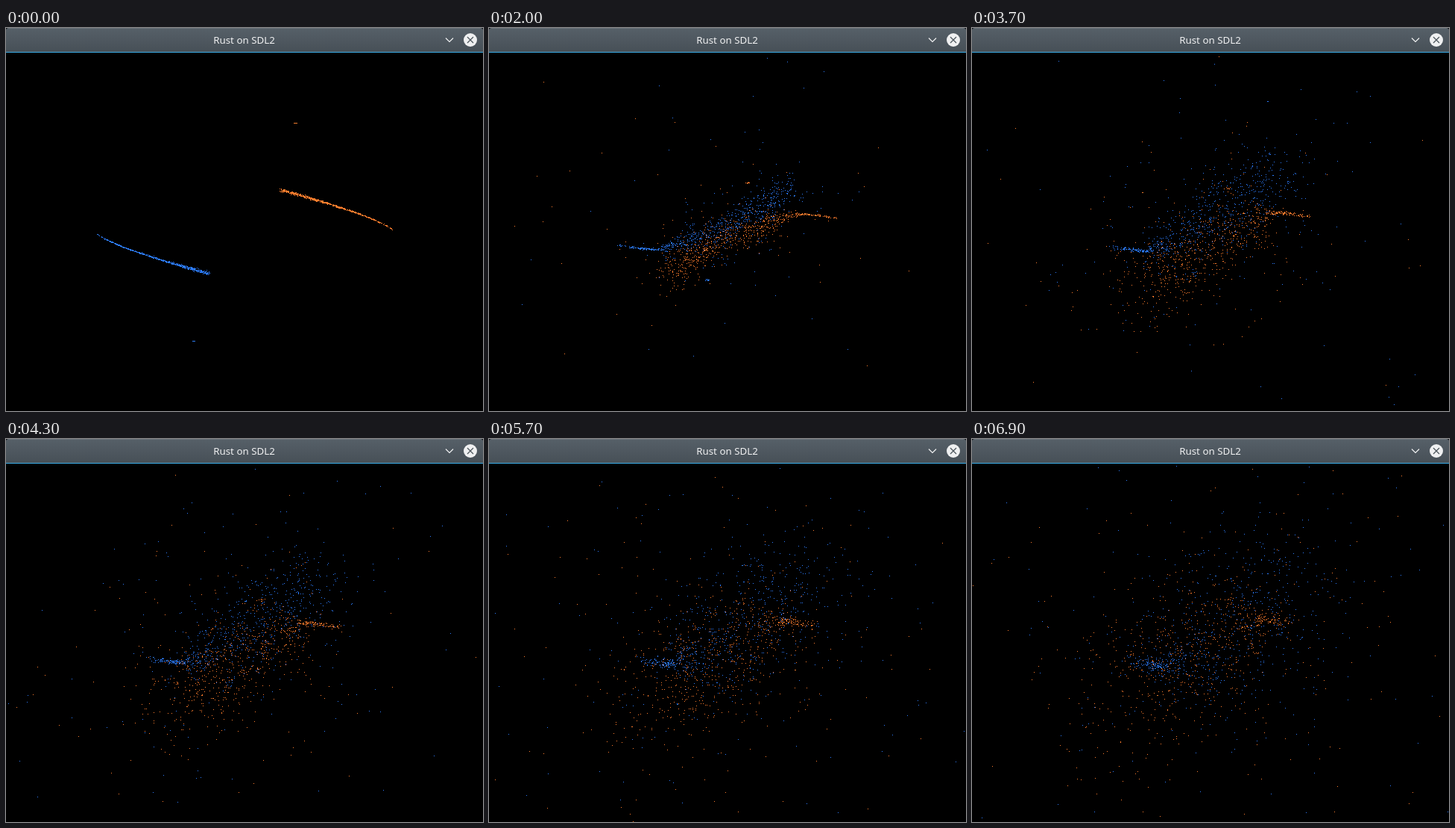
An HTML page with a canvas for the animation above (7 s loop, 640x513 px).

```html
<!DOCTYPE html>
<html lang="en">
<head>
<meta charset="utf-8">
<title>Rust on SDL2</title>
<style>
  html, body { margin: 0; width: 100%; height: 100%; overflow: hidden; background: #000; }
  canvas, svg { position: absolute; left: 0; top: 0; display: block; }
  text { font: 13.33px "Noto Sans", sans-serif; fill: #eff0f1; }
</style>
</head>
<body>
<canvas id="stage" width="640" height="513"></canvas>
<svg width="640" height="33" viewBox="0 0 640 33">
  <defs>
    <linearGradient id="bar" x1="0" y1="0" x2="0" y2="1">
      <stop offset="0" stop-color="#566068"/>
      <stop offset="1" stop-color="#475057"/>
    </linearGradient>
  </defs>
  <path d="M0 32V3Q0 0 3 0H637Q640 0 640 3V32Z" fill="url(#bar)"/>
  <path d="M3 .5H637" stroke="#69727a"/>
  <path d="M0 32.5H640" stroke="#3daee9"/>
  <text x="319.5" y="21" text-anchor="middle">Rust on SDL2</text>
  <path d="M590 13.5L595 18.5L600 13.5" fill="none" stroke="#eff0f1" stroke-width="1.2"/>
  <circle cx="623" cy="16" r="9" fill="#eff0f1"/>
  <path d="M619 12L627 20M627 12L619 20" stroke="#4b545b" stroke-width="1.2"/>
</svg>
<script>
const LOOP = 7000, STEP = 100, BAR = 33;
const CX = 320.3, CY = 273;
const MEET = 1.1, END = 6.9;   // seconds: strands have crossed, last picture
const COLORS = ['#2d7dff', '#ff7d2d'];
const ctx = document.getElementById('stage').getContext('2d');

let seed = 20177;
function rand() {
  seed = (seed + 0x6D2B79F5) | 0;
  let r = Math.imul(seed ^ (seed >>> 15), 1 | seed);
  r = (r + Math.imul(r ^ (r >>> 7), 61 | r)) ^ r;
  return ((r ^ (r >>> 14)) >>> 0) / 4294967296;
}

const lerp = (a, b, f) => a + (b - a) * f;
const clamp = v => Math.max(0, Math.min(1, v));
function smooth(a, b, v) {
  const f = clamp((v - a) / (b - a));
  return f * f * (3 - 2 * f);
}

// Blue strand at time t; u runs from the calm outer tail (0) to the head (1).
// The strands first swing through each other, then all but the tail disperses.
function strand(u, t) {
  const swing = clamp(t / MEET), g = Math.max(0, (t - MEET) / (END - MEET));
  const loose = smooth(.2, .45, u);
  const x = lerp(122 + 150 * u, 166 + 236 * u, swing);
  const y = lerp(275 + 54 * u ** .75, 290 + 50 * u - 98 * u * u, swing);
  const bulge = 14 * loose * Math.sin(Math.PI * g);
  return {
    x: x + g * (45 - 20 * u),
    y: y + Math.sqrt(g) * (8 * g - 60 * u ** 1.5 * loose) - bulge,
    spread: lerp(.3 + .8 * u * u, .6 + 4.5 * u ** 8, swing) + 3.5 * g * g + 42 * loose * g ** .9
  };
}

// Small knot of dots that falls towards the middle and slows down.
function knot(u, t) {
  const fall = 1 / (1 + 2 * t);
  return { x: 301 + 4 * u - 51 * fall, y: 318 + 101 * fall, spread: .15 * t * t };
}

function makeDot(shape, side) {
  return {
    shape, side,
    u: rand() ** .75,
    radius: Math.sqrt(-2 * Math.log(1 - rand())),
    far: rand() < .17 ? 2 : 0,
    angle: rand() * Math.PI * 2,
    turn: (rand() - .5) * 1.6
  };
}

function makeStray(side) {
  const launch = .82 + 6 * rand();
  const end = (rand() < .5 ? -1 : 1) * rand() ** (launch < 1.5 ? .1 : .6);
  const angle = rand() * Math.PI * 2, speed = 30 + 600 * rand() ** 2;
  return {
    side, launch,
    x: CX + 84 * end, y: CY - 31 * end,
    vx: Math.cos(angle) * speed, vy: Math.sin(angle) * speed
  };
}

const dots = [], strays = [];
for (let side = 0; side < 2; side++) {
  for (let i = 0; i < 680; i++) dots.push(makeDot(strand, side));
  for (let i = 0; i < 9; i++) dots.push(makeDot(knot, side));
  for (let i = 0; i < 300; i++) strays.push(makeStray(side));
}

function plot(x, y, side) {
  if (y < BAR) return;
  ctx.fillStyle = COLORS[side];
  ctx.fillRect(Math.floor(x), Math.floor(y), 1, 1);
}

function draw(t) {
  ctx.fillStyle = '#000';
  ctx.fillRect(0, 0, 640, 513);

  for (const d of dots) {
    const { x, y, spread } = d.shape(d.u, t);
    const r = d.radius * spread * (1 + d.far * Math.min(1, spread / 6));
    const a = d.angle + d.turn * t;
    const px = x + r * Math.cos(a), py = y + r * Math.sin(a);
    // Orange is blue turned half a circle about the centre.
    if (d.side) plot(2 * CX - px, 2 * CY - py, 1);
    else plot(px, py, 0);
  }
  for (const s of strays) {
    const age = t - s.launch;
    if (age > 0) plot(s.x + s.vx * age, s.y + s.vy * age, s.side);
  }
}

const start = performance.now();
let shown = -1;
function tick() {
  const step = Math.floor(((performance.now() - start) % LOOP) / STEP);
  if (step !== shown) {
    shown = step;
    draw(step * STEP / 1000);
  }
  requestAnimationFrame(tick);
}
tick();
</script>
</body>
</html>
```
